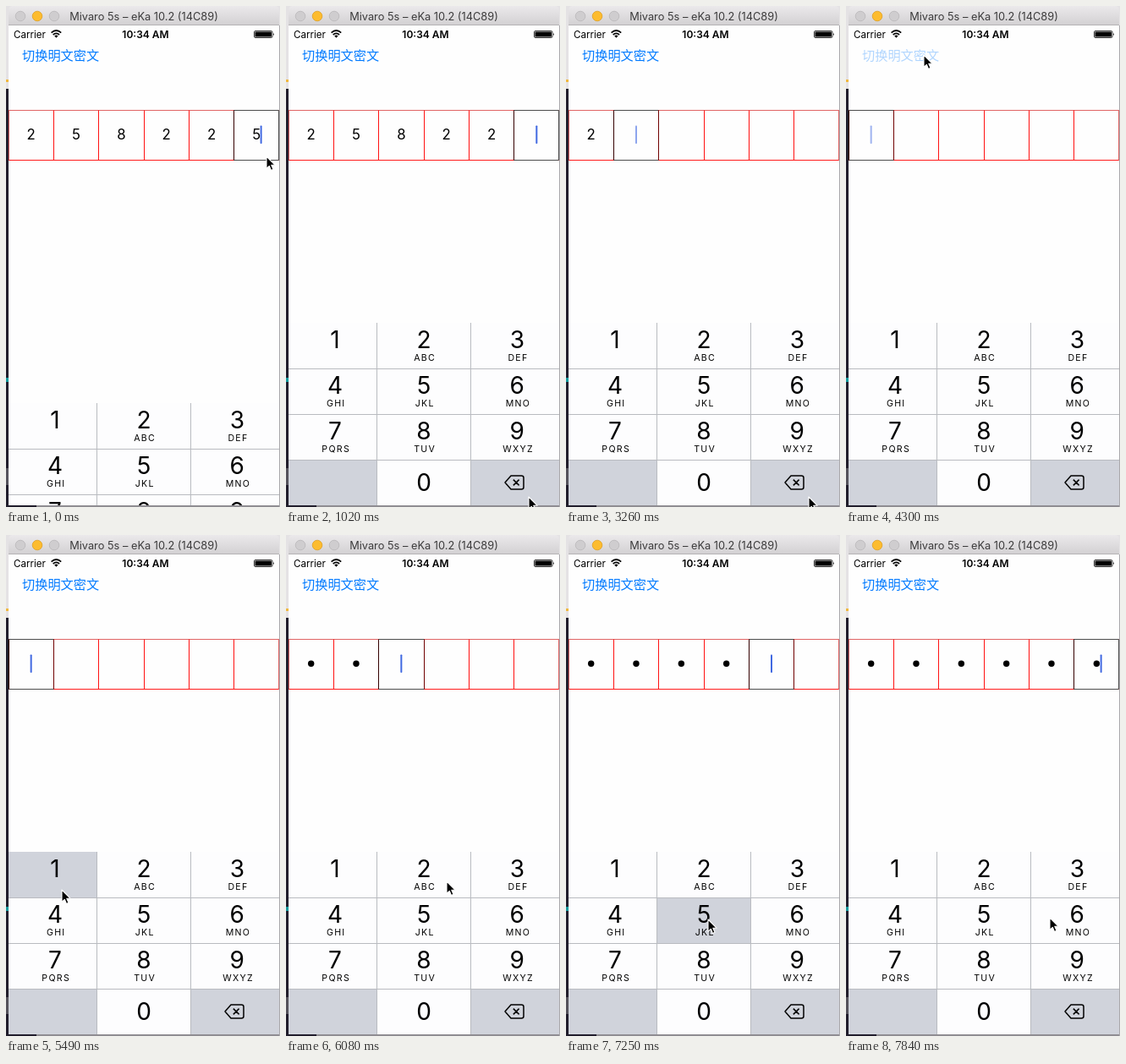
An HTML page for the animation above (7990 ms loop, 324 by 593 pixels).

```html
<!DOCTYPE html>
<html lang="zh">
<head>
<meta charset="utf-8">
<title>Passcode field</title>
<style>
html, body { margin: 0; width: 100%; height: 100%; overflow: hidden; background: #fff; }
svg { display: block; width: 100vw; height: 100vh; font-family: Inter, Roboto, sans-serif; }
</style>
</head>
<body>
<svg id="stage" viewBox="0 0 324 593" xmlns="http://www.w3.org/2000/svg">
  <defs>
    <linearGradient id="bar" x2="0" y2="1">
      <stop offset="0" stop-color="#ebe9eb"/><stop offset="1" stop-color="#d2d0d2"/>
    </linearGradient>
    <clipPath id="screen"><rect x="3" y="23" width="320" height="568"/></clipPath>
  </defs>

  <!-- desktop behind the window -->
  <rect width="324" height="593" fill="#e4e2e4"/>
  <rect y="98" width="4" height="495" fill="#211e2c"/>
  <rect y="87" width="3" height="3" fill="#f0b840"/>
  <rect y="440" width="3" height="5" fill="#159a9c"/>
  <rect y="547" width="3" height="20" fill="#55535c"/>
  <rect y="591" width="324" height="2" fill="#8f8d92"/>
  <rect y="591" width="36" height="2" fill="#211e2c"/>
  <rect x="323" y="23" width="1" height="570" fill="#a9a8ab"/>

  <!-- window -->
  <rect x="3" y="20" width="320" height="571" fill="#fefefe"/>
  <path d="M3 23V5Q3 0 8 0H318Q323 0 323 5V23Z" fill="url(#bar)"/>
  <path d="M3 22.5H323" stroke="#b4b2b4"/>
  <g stroke-width=".8">
    <circle cx="17" cy="12" r="5.8" fill="#cfcdcf" stroke="#b9b7b9"/>
    <circle cx="37" cy="12" r="5.8" fill="#fdbc2e" stroke="#dfa023"/>
    <circle cx="57" cy="12" r="5.8" fill="#cfcdcf" stroke="#b9b7b9"/>
  </g>
  <text x="163" y="17" text-anchor="middle" font-size="12.8" fill="#3c3b3c">Mivaro 5s – eKa 10.2 (14C89)</text>

  <!-- status bar -->
  <text x="9" y="38" font-size="11.6">Carrier</text>
  <g fill="none" stroke="#000" stroke-width="1.7">
    <path d="M53.6 31.6Q59.4 26.4 65.2 31.6M55.7 34Q59.4 30.8 63.1 34"/>
  </g>
  <path d="M57.2 35.3Q59.4 33.6 61.6 35.3L59.4 37.8Z"/>
  <text x="165" y="37.7" text-anchor="middle" font-size="12" font-weight="600">10:34 AM</text>
  <rect x="293.5" y="29.5" width="21.5" height="8" rx="1.5" fill="none" stroke="#000" stroke-width=".8"/>
  <rect x="294.5" y="30.5" width="19.5" height="6" rx=".6"/>
  <path d="M316 32Q317.8 33.5 316 35Z"/>

  <text id="toggle" x="19" y="64" font-size="15.2" fill="#007aff" font-family="'Noto Sans CJK SC','Noto Sans CJK',sans-serif">切换明文密文</text>

  <g id="cells"></g>
  <g clip-path="url(#screen)"><g id="keyboard"></g></g>
  <path id="mouse" d="M0 0V14.3L3.3 11.3L5.5 16.4L8 15.3L5.8 10.3H10.2Z" stroke="#fff" stroke-width="1.1" stroke-linejoin="round"/>
</svg>

<script>
const LOOP = 7990, TICK = 148.1, LAST = 53;
const CELL = 320 / 6, TOP = 123.5, BOTTOM = 182.5;
const GREY = '#d0d3db', WHITE = '#fdfdfe';
const $ = id => document.getElementById(id);

function add(parent, tag, attrs, text) {
  const el = document.createElementNS('http://www.w3.org/2000/svg', tag);
  set(el, attrs);
  if (text) el.textContent = text;
  return parent.appendChild(el);
}
function set(el, attrs) {
  for (const name in attrs) el.setAttribute(name, attrs[name]);
}

// passcode cells
const cellLeft = i => Math.floor(3 + i * CELL) + .5;
const cellMid = i => 3 + (i + .5) * CELL;
const cells = $('cells');
const hline = (a, b, y) => `M${a} ${y}H${b}`;
const vline = x => `M${x} ${TOP}V${BOTTOM}`;

add(cells, 'path', { d: hline(3, 323, TOP), stroke: '#e06464' });
add(cells, 'path', { d: hline(3, 323, BOTTOM), stroke: '#ff1a1a' });
for (let i = 0; i < 7; i++) {
  add(cells, 'path', { d: vline(i < 6 ? cellLeft(i) : 322.5), stroke: i % 6 ? '#ff1010' : '#e06464' });
}
const frame = add(cells, 'path', { fill: 'none', stroke: '#4c4c4c' });
const frameLeft = add(cells, 'path', { stroke: '#300' });
const frameRight = add(cells, 'path', {});

const digits = [...'258225'].map((d, i) =>
  add(cells, 'text', { x: cellMid(i), y: 158, 'text-anchor': 'middle', 'font-size': 16.8 }, d));
const dots = digits.map((_, i) => add(cells, 'circle', { cx: cellMid(i), cy: 152.2, r: 3.7 }));
const caret = add(cells, 'rect', { y: 141.5, width: 2, height: 21.5, rx: .8, fill: '#4169e1' });

// number pad
const pad = $('keyboard');
const colX = [3, 108, 219, 323], labelX = [58, 163, 273.3];
const rowY = r => 375 + r * 54.2;
const letters = ['', 'ABC', 'DEF', 'GHI', 'JKL', 'MNO', 'PQRS', 'TUV', 'WXYZ'];
const keys = [];
for (let i = 0; i < 12; i++) {
  const c = i % 3, r = Math.floor(i / 3), y = rowY(r);
  keys.push(add(pad, 'rect', { x: colX[c], y, width: colX[c + 1] - colX[c], height: 54.2, fill: i === 9 || i === 11 ? GREY : WHITE }));
  const name = i < 9 ? String(i + 1) : i === 10 ? '0' : '';
  if (name) add(pad, 'text', { x: labelX[c], y: Math.round(y) + (i === 10 ? 36 : 30), 'text-anchor': 'middle', 'font-size': 28 }, name);
  if (letters[i]) add(pad, 'text', { x: labelX[c] + 1.2, y: Math.round(y) + 45, 'text-anchor': 'middle', 'font-size': 10.6, 'letter-spacing': 1.3 }, letters[i]);
}
add(pad, 'path', {
  d: [429.5, 483.5, 537.5].map(y => hline(3, 323, y)).join('') + 'M107.5 375V591M218.5 375V591',
  stroke: '#b9bbc0'
});
add(pad, 'path', {
  d: 'M266 556H278.5Q281 556 281 558.5V569.5Q281 572 278.5 572H266L259 564ZM268.8 560.6L275.6 567.4M275.6 560.6L268.8 567.4',
  fill: 'none', stroke: '#000', 'stroke-width': 1.5, 'stroke-linejoin': 'round'
});

// delete key: [down, up] ticks; digit keys: down tick, released one tick later
const erases = [[6, 7], [8, 9], [11, 13], [15, 16], [18, 20], [23, 24]];
const taps = [37, 40, 42, 46, 49, 52];

// pointer path: tick, x, y
const route = [
  [0, 308, 178], [2, 312, 320], [4, 298, 520], [6, 287, 581], [24, 287, 581],
  [26, 210, 380], [28, 105, 90], [29, 92, 58], [31, 92, 58], [33, 140, 260],
  [35, 80, 443], [36, 66, 420], [38, 66, 420], [40, 168, 410], [41, 190, 410],
  [42, 277, 410], [43, 277, 412], [45, 76, 450], [47, 76, 450], [49, 168, 455],
  [50, 172, 455], [51, 241, 453], [53, 241, 453]
];
function pointer(k) {
  const n = Math.max(1, route.findIndex(p => p[0] >= k));
  const [t0, x0, y0] = route[n - 1], [t1, x1, y1] = route[n];
  const f = (k - t0) / (t1 - t0);
  return [x0 + (x1 - x0) * f, y0 + (y1 - y0) * f];
}

const blink = [1, 1, .6, 0, 0, .5, 1];
function caretAlpha(k, erasing) {
  if (erasing || k > 36) return 1;
  const since = Math.max(0, ...erases.map(e => e[1]).filter(t => t <= k));
  return blink[(k - since) % blink.length];
}

function draw(time) {
  const k = Math.min(LAST, Math.floor((time % LOOP + 17) / TICK));
  const erased = erases.filter(e => e[1] <= k).length;
  const typed = taps.filter(t => t < k).length;
  const erasing = erases.some(e => e[0] <= k && k < e[1]);
  const filled = 6 - erased + typed;
  const active = Math.min(5, filled);

  digits.forEach((d, i) => set(d, { opacity: i < 6 - erased ? 1 : 0 }));
  dots.forEach((d, i) => set(d, { opacity: i < typed ? 1 : 0 }));

  const left = cellLeft(active), right = active < 5 ? cellLeft(active + 1) : 322.5;
  set(frame, { d: hline(left, right, TOP) + hline(left, right, BOTTOM) });
  set(frameLeft, { d: vline(left) });
  set(frameRight, { d: vline(right), stroke: active < 5 ? '#700000' : '#4c4c4c' });
  set(caret, {
    x: cellMid(active) - 1 + (filled === 6 ? 5.3 : 0),
    opacity: caretAlpha(k, erasing)
  });

  taps.forEach((t, i) => set(keys[i], { fill: t === k ? GREY : WHITE }));
  set(keys[11], { fill: erasing ? WHITE : GREY });
  set($('toggle'), { opacity: k === 29 || k === 30 ? .3 : 1 });

  const drop = Math.round(95 * Math.exp(-k * TICK / 80));
  set(pad, { transform: `translate(0 ${drop})` });
  const [x, y] = pointer(k);
  set($('mouse'), { transform: `translate(${x} ${y})` });
}

const start = performance.now();
function loop() {
  draw(performance.now() - start);
  requestAnimationFrame(loop);
}
loop();
</script>
</body>
</html>
```
